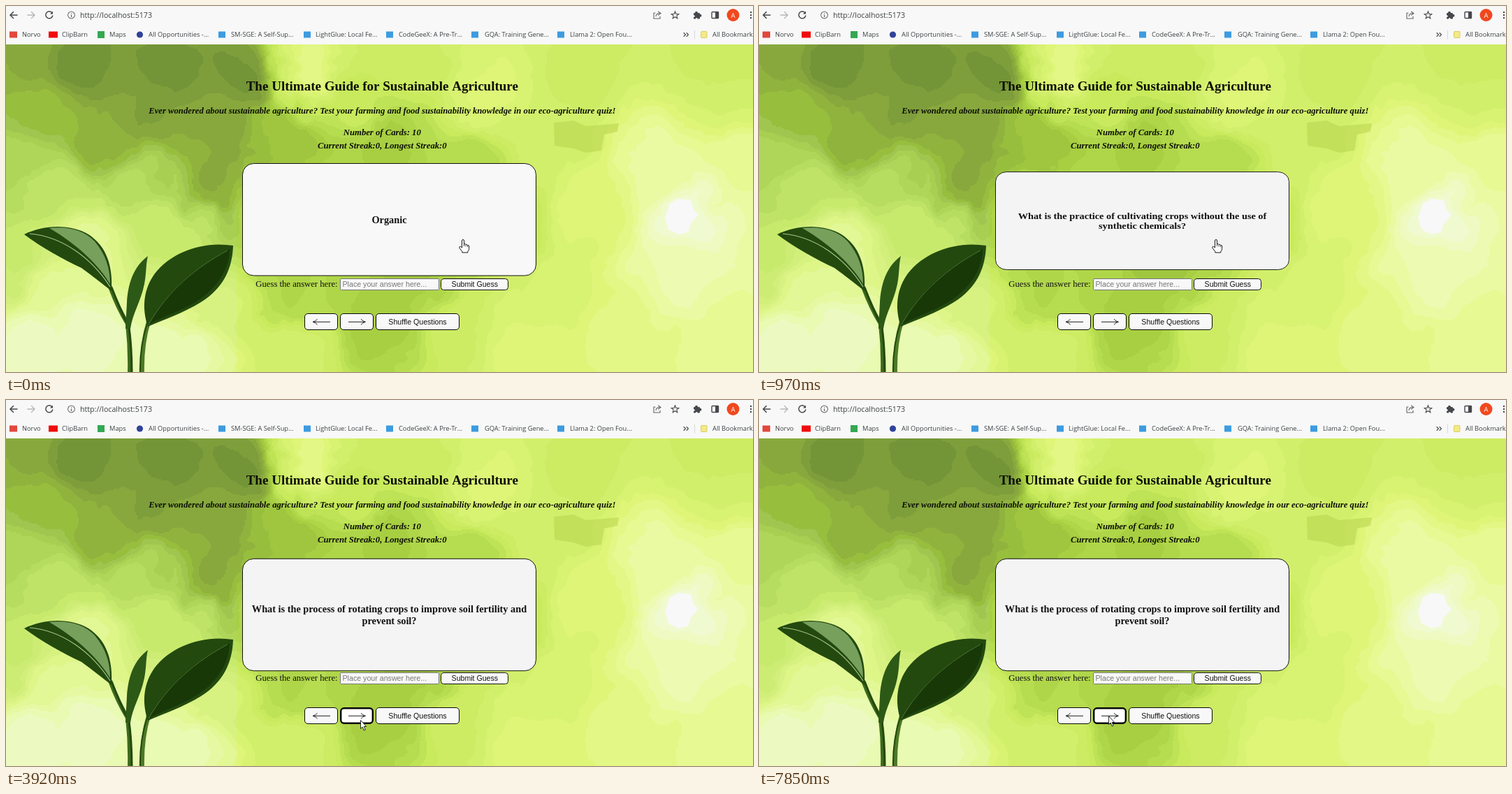
Write an HTML page with a canvas that moves like this. It is 1069 px wide and 524 px high and loops after 8000 ms.

```html
<!DOCTYPE html>
<html lang="en">
<head>
<meta charset="utf-8">
<title>Flashcard quiz</title>
<style>
html, body { margin: 0; width: 100%; height: 100%; overflow: hidden; background: #f8f8f8; }
canvas { display: block; }
</style>
</head>
<body>
<canvas id="stage" width="1069" height="524"></canvas>
<script>
const W = 1069, H = 524, TOP = 55, LOOP = 8000;
const SERIF = '"Liberation Serif", serif';
const SANS = '"Liberation Sans", sans-serif';
const UI = '"Open Sans", sans-serif';
const ctx = document.getElementById('stage').getContext('2d');

function label(c, str, x, y, font, color = '#111', align = 'left') {
  c.font = font;
  c.fillStyle = color;
  c.textAlign = align;
  c.fillText(str, x, y);
}

function box(c, x, y, w, h, r, fill, stroke, line = 1) {
  c.beginPath();
  c.roundRect(x, y, w, h, r);
  if (fill) { c.fillStyle = fill; c.fill(); }
  if (stroke) { c.strokeStyle = stroke; c.lineWidth = line; c.stroke(); }
}

function dot(c, x, y, r, fill) {
  c.beginPath();
  c.arc(x, y, r, 0, 7);
  c.fillStyle = fill;
  c.fill();
}

function shape(c, d, fill, stroke, line = 1) {
  const p = new Path2D(d);
  if (fill) { c.fillStyle = fill; c.fill(p); }
  if (stroke) { c.strokeStyle = stroke; c.lineWidth = line; c.stroke(p); }
}

// Backdrop: soft tone field cut into flat bands
const RAMP = [
  [116, 148, 56], [136, 168, 62], [152, 190, 62], [168, 207, 66],
  [182, 220, 80], [200, 234, 92], [210, 239, 108], [222, 245, 120],
  [230, 249, 146], [236, 250, 178], [240, 250, 208], [248, 248, 248]
];
const TONES = [
  [20, 90, 1.2], [110, 85, 0], [240, 90, 0], [345, 95, 0], [200, 150, .7],
  [320, 185, .9], [50, 155, 2], [22, 225, 3.6], [120, 195, 1.5], [300, 250, 1.1],
  [180, 255, 4], [75, 270, 4.6], [25, 370, 5], [120, 335, 7.6], [240, 320, 5],
  [60, 410, 7.6], [25, 480, 9], [120, 470, 9], [250, 490, 8.6], [290, 425, 6.4],
  [395, 190, 2.3], [385, 290, 3.8], [430, 95, 7.8], [510, 130, 5], [540, 205, 3],
  [470, 300, 3.6], [590, 350, 2.4], [650, 235, 3.8], [715, 310, 4.5], [400, 405, 3.7],
  [390, 485, 6.2], [545, 450, 3], [645, 470, 5.6], [740, 490, 7], [560, 75, 5.6],
  [690, 115, 6.8], [830, 95, 5.6], [1030, 75, 5.4], [765, 195, 6], [835, 290, 7],
  [790, 400, 6.4], [895, 470, 7.4], [925, 225, 8.4], [1040, 135, 6.2], [1050, 240, 8.2],
  [965, 300, 10.3], [960, 385, 8.9], [1030, 455, 8.2]
];

function hash(i, j) {
  const s = Math.sin(i * 127.1 + j * 311.7) * 43758.5453;
  return s - Math.floor(s);
}

function noise(x, y) {
  const i = Math.floor(x), j = Math.floor(y);
  const ease = f => f * f * (3 - 2 * f);
  const u = ease(x - i), v = ease(y - j);
  const a = hash(i, j) * (1 - u) + hash(i + 1, j) * u;
  const b = hash(i, j + 1) * (1 - u) + hash(i + 1, j + 1) * u;
  return a * (1 - v) + b * v - .5;
}

function toneAt(x, y) {
  const px = x + 34 * noise(x / 42, y / 42) + 8 * noise(x / 11, y / 11);
  const py = y + 34 * noise(x / 42 + 50, y / 42) + 8 * noise(x / 11 + 50, y / 11);
  let sum = 0, total = 0;
  for (const [tx, ty, tone] of TONES) {
    const d = (px - tx) ** 2 + (py - ty) ** 2 + 500;
    const w = 1 / (d * d);
    sum += w * tone;
    total += w;
  }
  return sum / total;
}

function drawBackdrop(c) {
  const w = Math.ceil(W / 2), h = Math.ceil((H - TOP) / 2);
  const small = document.createElement('canvas');
  small.width = w;
  small.height = h;
  const s = small.getContext('2d');
  const img = s.createImageData(w, h);
  for (let y = 0, k = 0; y < h; y++) {
    for (let x = 0; x < w; x++, k += 4) {
      const t = Math.round(toneAt(x * 2, TOP + y * 2) * 2) / 2;
      const i = Math.min(10, Math.floor(t)), f = t - i;
      for (let n = 0; n < 3; n++) img.data[k + n] = RAMP[i][n] * (1 - f) + RAMP[i + 1][n] * f;
      // cooler greens on the left
      if (x < 165 && t > 2) img.data[k + 2] += 16;
      img.data[k + 3] = 255;
    }
  }
  s.putImageData(img, 0, 0);
  c.imageSmoothingEnabled = false;
  c.drawImage(small, 0, TOP, w * 2, h * 2);
  shape(c, 'M943 303L950 283L962 276L980 278L984 292L991 299L980 312L976 324L962 327L948 320Z', '#f8f8f8');
  shape(c, 'M784 167L812 164L830 172L877 168L875 180L856 184L852 207L830 210L812 204L785 200Z', 'rgba(176,205,70,.45)');
}

function drawPlant(c) {
  const dark = '#23490f', stem = '#3d6a1c';
  shape(c, 'M149 402Q160 432 174 455Q178 490 177 526', null, stem, 6);
  shape(c, 'M151 403Q163 434 176 460Q180 490 180 526', null, dark, 3);
  shape(c, 'M204 452Q194 484 195 526', null, '#4c7a25', 6);
  shape(c, 'M202 455Q191 488 192 526', null, dark, 2);
  shape(c, 'M26 327C55 313 92 312 118 327C144 344 153 372 151 408C138 398 122 385 108 375C82 363 50 345 26 327Z', dark);
  shape(c, 'M62 318C90 315 113 322 127 337C143 356 149 376 149 398C133 372 105 343 62 318Z', '#76a05c');
  shape(c, 'M34 326C80 330 122 360 149 402', null, '#a4c584', 1.2);
  shape(c, 'M203 358C184 372 175 394 173 424L171 462L178 462C181 440 193 423 198 398C201 382 200 370 203 358Z', '#2d5916');
  shape(c, 'M325 343C281 336 236 353 213 383C197 405 194 432 203 459C226 449 253 440 279 424C311 404 324 376 325 343Z', dark);
  shape(c, 'M320 348C275 371 231 405 204 456C235 440 264 432 286 413C309 394 320 370 320 348Z', '#183808');
  shape(c, 'M317 350C272 374 231 408 204 456', null, '#4d7830', 1);
}

function drawBrowser(c) {
  const ink = '#45484c';
  c.fillStyle = '#f8f8f8';
  c.fillRect(0, 0, W, TOP);
  c.lineCap = 'round';
  shape(c, 'M16 13H6M10.5 8.5L6 13L10.5 17.5', null, ink, 1.5);
  shape(c, 'M31 13H41M36.5 8.5L41 13L36.5 17.5', null, '#b4b6b8', 1.4);
  shape(c, 'M66 10A5 5 0 1 0 66.7 14', null, ink, 1.5);
  shape(c, 'M67 7.5V11.5H63Z', ink);
  dot(c, 93.5, 13, 5.4, '#5f6368');
  dot(c, 93.5, 13, 4.4, '#f8f8f8');
  shape(c, 'M93.5 12.8V15.5M93.5 10.5V10.6', null, '#5f6368', 1.2);
  label(c, 'http://localhost:5173', 106, 17, `10.65px ${UI}`, '#3c4043');

  shape(c, 'M929 10H927V18H936V15M930 14.5Q931 10.5 935 10.5M933.5 8L937 10.5L933.5 13', null, '#606468', 1.1);
  let star = '';
  for (let i = 0; i < 10; i++) {
    const r = i % 2 ? 2.4 : 5.6, a = i * Math.PI / 5 - Math.PI / 2;
    star += (i ? 'L' : 'M') + (957.5 + r * Math.cos(a)) + ' ' + (13.3 + r * Math.sin(a));
  }
  shape(c, star + 'Z', null, ink, 1.1);
  box(c, 984, 10, 9, 8.5, 1, ink);
  dot(c, 988, 9.7, 2, ink);
  dot(c, 993.4, 13.7, 2, ink);
  dot(c, 984.2, 14.4, 1.5, '#f8f8f8');
  dot(c, 988.3, 18.5, 1.5, '#f8f8f8');
  box(c, 1010, 8.5, 9.5, 9, 1, null, ink, 1.4);
  c.fillStyle = ink;
  c.fillRect(1015, 8, 5, 10);
  dot(c, 1040.5, 13, 9, '#f0481e');
  label(c, 'A', 1040.5, 16.5, `9.5px ${UI}`, '#fff', 'center');
  [9, 13, 17].forEach(y => dot(c, 1066, y, 1.2, ink));

  const mark = (x, w, h, color) => { c.fillStyle = color; c.fillRect(x, 41 - h / 2, w, h); };
  mark(5, 11, 9, '#e2483d');
  mark(61, 13, 9, '#f00c0c');
  mark(131, 10, 10, '#34a853');
  dot(c, 191.5, 41, 4.6, '#30439a');
  [304, 426, 544, 666, 789].forEach(x => mark(x, 10, 9, '#3d9be0'));
  const marks = [
    ['Norvo', 23], ['ClipBarn', 80], ['Maps', 148], ['All Opportunities -...', 204],
    ['SM-SGE: A Self-Sup...', 322], ['LightGlue: Local Fe...', 443],
    ['CodeGeeX: A Pre-Tr...', 562], ['GQA: Training Gene...', 685],
    ['Llama 2: Open Fou...', 807], ['All Bookmarks', 1011]
  ];
  marks.forEach(([str, x]) => label(c, str, x, 44.3, `9.3px ${UI}`, '#3c4043'));
  shape(c, 'M970 38.5L972.5 41L970 43.5M974 38.5L976.5 41L974 43.5', null, ink, 1.1);
  shape(c, 'M985.5 35V47', null, '#d5d9dc', 1);
  box(c, 994.5, 36.5, 8.5, 9, 1, '#f3ea86', '#d9cd62');
}

function drawPage(c) {
  const mid = 538.3, sub = `italic bold 12.7px ${SERIF}`;
  label(c, 'The Ultimate Guide for Sustainable Agriculture', mid, 121, `bold 19.05px ${SERIF}`, '#0c0f04', 'center');
  label(c, 'Ever wondered about sustainable agriculture? Test your farming and food sustainability knowledge in our eco-agriculture quiz!', mid, 153.5, sub, '#0c0f04', 'center');
  label(c, 'Number of Cards: 10', mid, 184.7, sub, '#0c0f04', 'center');
  label(c, 'Current Streak:0, Longest Streak:0', mid, 203.7, sub, '#0c0f04', 'center');
  label(c, 'Guess the answer here:', 357.3, 402, `12.7px ${SERIF}`);
  box(c, 478.5, 390.5, 141, 16, 1, '#f8f8f8', '#777');
  label(c, 'Place your answer here...', 481.5, 402, `10.65px ${SANS}`, '#777');
  box(c, 622.5, 390.5, 96, 16, 4, '#f8f8f8', '#111');
  label(c, 'Submit Guess', 670.8, 402, `10.58px ${SANS}`, '#111', 'center');
}

const layer = document.createElement('canvas');
layer.width = W;
layer.height = H;
const still = layer.getContext('2d');
drawBackdrop(still);
drawPlant(still);
drawBrowser(still);
drawPage(still);

// Every track holds [start time, ...values]
const CARDS = [
  [0, ['Organic']],
  [850, ['What is the practice of cultivating crops without the use of', 'synthetic chemicals?']],
  [2470, ['What is the key principle of sustainable agriculture?']],
  [3920, ['What is the process of rotating crops to improve soil fertility and', 'prevent soil?']],
  [4870, ['Which farming method focuses on integrating plants and', 'animals to create a self-sustaining ecosystem?']],
  [6770, ['What is the process of rotating crops to improve soil fertility and', 'prevent soil?']]
];
// top and height of the card while it turns
const TURN = [[0, 225.5, 160.5], [140, 225.5, 161], [850, 307, 0], [970, 237.5, 140], [1130, 228, 159], [1270, 227.3, 160.4]];
const POINTER = [
  [0, 654, 334], [1530, 618, 366], [1655, 566, 414], [1780, 524, 447], [1930, 509, 457],
  [2050, 507, 458], [5430, 542, 455], [5560, 570, 454], [5710, 574, 454],
  [7470, 556, 454], [7590, 526, 453], [7710, 504, 452], [7850, 500, 452]
];
const FOCUS = [[0, ''], [2050, 'next'], [5560, 'shuffle'], [7710, 'next']];

const at = (track, t) => track.findLast(step => step[0] <= t);

function drawCard(t) {
  const [, top, h] = at(TURN, t);
  if (!h) return;
  const [start, lines] = at(CARDS, t);
  const front = start > 0;
  ctx.save();
  ctx.translate(548.5, top + h / 2);
  ctx.scale(1, h / 160.5);
  box(ctx, -210, -80.25, 420, 160.5, 16, front ? '#f4f4f4' : '#f8f8f8', '#111');
  lines.forEach((str, i) => {
    const y = 4.9 + (i - (lines.length - 1) / 2) * 16.6;
    label(ctx, str, 0, y, `bold 14.3px ${SERIF}`, '#111', 'center');
  });
  ctx.restore();
}

function button(x, w, focused) {
  const inset = focused ? 1.2 : .5;
  box(ctx, x + inset, 440 + inset, w - 2 * inset, 24 - 2 * inset, 4.5, focused ? '#fff' : '#f8f8f8', '#080808', focused ? 2.4 : 1);
}

function drawButtons(t) {
  const focus = at(FOCUS, t)[1];
  button(427, 48, false);
  button(478, 48, focus === 'next');
  button(529, 120, focus === 'shuffle');
  shape(ctx, 'M464 452.3H440M445.5 448.3Q443 451.5 439 452.3Q443 453 445.5 456.3', null, '#222', 1);
  shape(ctx, 'M490 452.3H513M508 448.3Q510.5 451.5 514.5 452.3Q510.5 453 508 456.3', null, '#222', 1);
  label(ctx, 'Shuffle Questions', 589, 456, `10.58px ${SANS}`, '#111', 'center');
}

function drawPointer(t) {
  const [, x, y] = at(POINTER, t);
  ctx.save();
  ctx.translate(x, y);
  ctx.lineJoin = 'round';
  if (t < 1655) {
    shape(ctx, 'M-1.5 12V2Q-1.5 .5 0 .5Q1.5 .5 1.5 2V7Q3.7 5.8 4.1 7.7Q6.2 6.8 6.5 8.6Q8.6 8 8.6 10V13.5Q8.5 16 6.8 17.5V19H-1.2V17.5L-5.2 12.3Q-5.5 10 -3.4 10.4Z', '#fff', '#16161c', 1);
    shape(ctx, 'M1.5 7V10M4.1 8V10.5M6.5 9V11', null, '#16161c', .8);
  } else {
    shape(ctx, 'M.5 .5V12.6L3.2 10.1L5.2 15L7.2 14.2L5.2 9.5H8.7Z', '#fff', '#16161c', .9);
  }
  ctx.restore();
}

function frame(now) {
  const t = now % LOOP;
  ctx.drawImage(layer, 0, 0);
  drawCard(t);
  drawButtons(t);
  drawPointer(t);
  requestAnimationFrame(frame);
}

const begin = performance.now();
frame(0);
requestAnimationFrame(function tick() {
  cancelAnimationFrame(tick.id);
});
</script>
</body>
</html>
```
